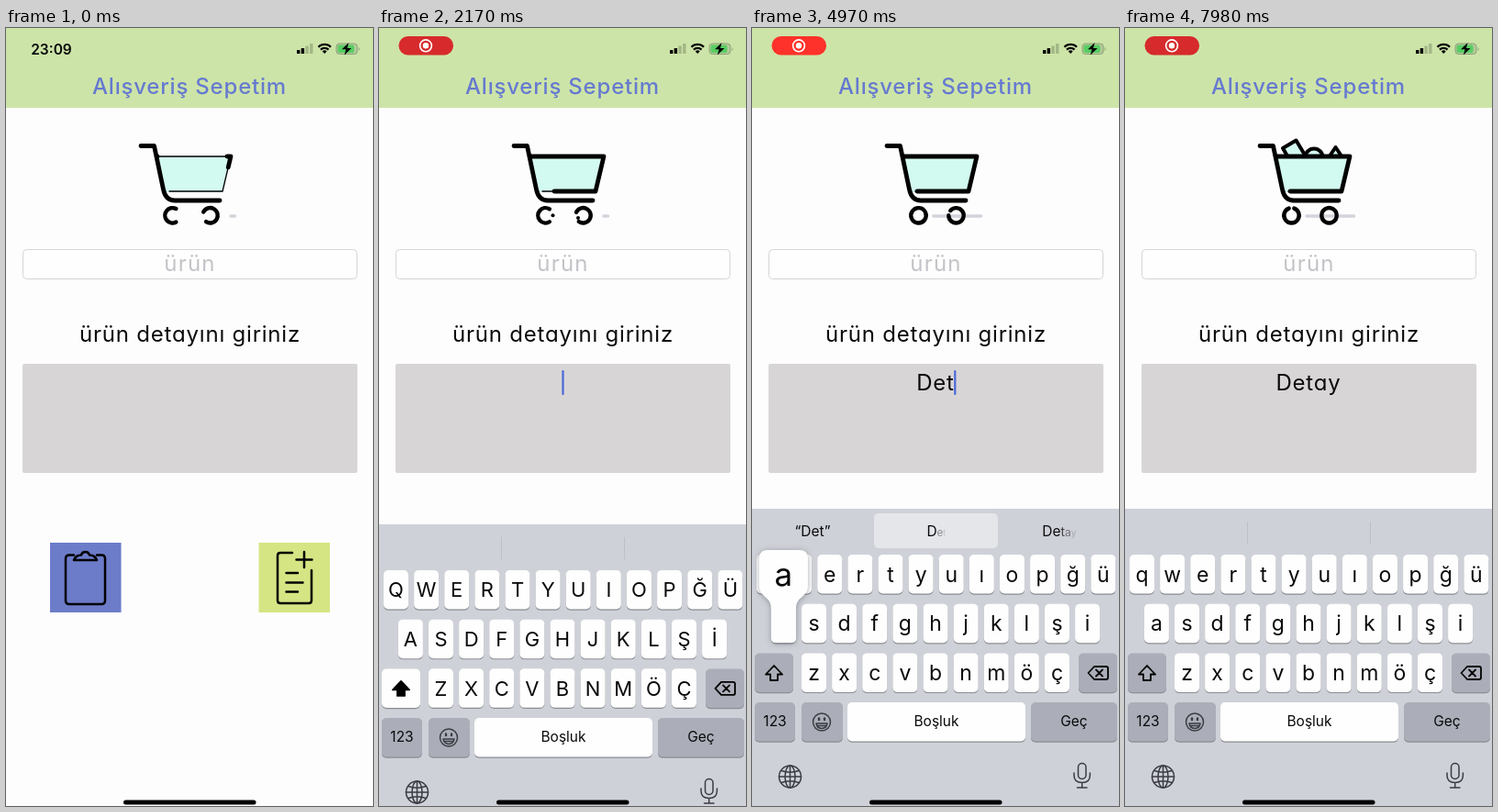
Animation, 400 px wide and 848 px high, one loop 8000 ms. Source, as an HTML page:

```html
<!DOCTYPE html>
<html lang="tr">
<head>
<meta charset="utf-8">
<title>Sepet</title>
<style>
  html, body { margin: 0; width: 100%; height: 100%; overflow: hidden; background: #fdfdfe; }
  svg { display: block; width: 400px; height: 848px; font-family: Inter, "Noto Sans", sans-serif; }
  text { text-anchor: middle; fill: #0a0a0c; white-space: pre; }
  .round { font-size: 24px; letter-spacing: .8px; font-feature-settings: "cv11"; }
  .line { fill: none; stroke: #000; stroke-linecap: round; stroke-linejoin: round; }
  .cart { stroke-width: 4.8; }
  .icon { stroke-width: 2.5; }
  .thin { stroke: #3a3c42; stroke-width: 1.5; }
  .ground { stroke: #d6d3dc; stroke-width: 3.6; }
  .item { fill: #d3faf0; stroke: #000; stroke-width: 4; stroke-linejoin: round; }
  .cap { font-size: 23px; }
  .small { font-size: 15.5px; }
</style>
</head>
<body>
<svg viewBox="0 0 400 848">
  <defs>
    <clipPath id="drop"><rect x="140" y="94" width="120" height="60"/></clipPath>
    <filter id="soft" x="-40%" y="-30%" width="180%" height="160%">
      <feDropShadow dx="0" dy="1" stdDeviation="3" flood-color="#50535c" flood-opacity=".5"/>
    </filter>
  </defs>
  <rect width="400" height="848" fill="#fdfdfe"/>
  <rect width="400" height="87" fill="#cde4a8"/>
  <text class="round" x="200" y="71.5" style="fill:#667ad0;font-weight:500">Alışveriş Sepetim</text>

  <text id="clock" x="49.5" y="28.5" font-size="15.5" font-weight="600">23:09</text>
  <g id="pill">
    <rect id="pillBody" x="21.5" y="9" width="59.5" height="20.5" rx="10"/>
    <circle cx="51" cy="19.3" r="6.4" fill="none" stroke="#fff" stroke-width="1.6"/>
    <circle cx="51" cy="19.3" r="3.2" fill="#fff"/>
  </g>
  <path d="M317 24h3.4v4H317zM321.700 22h3.400v6h-3.400z"/>
  <path d="M326.400 19.500h3.400v8.500h-3.400zM331.100 17h3.400v11h-3.400z" fill="#a3b686"/>
  <g class="line" stroke-width="2.3" style="stroke-linecap:butt">
    <path d="M340.500 20.700a9.500 9.500 0 0 1 13.500 0M343 23.600a6 6 0 0 1 8.500 0"/>
  </g>
  <path d="M344.800 25.500a3.400 3.400 0 0 1 4.900 0L347.200 28z"/>
  <rect x="360" y="17" width="23" height="11.500" rx="3.500" fill="#b4cb98" stroke="#8da078"/>
  <rect x="361.500" y="18.500" width="18" height="8.500" rx="2" fill="#58cd63"/>
  <path d="M384.700 21v4q2-2 0-4z" fill="#8da078"/>
  <path d="M373.500 16l-7.500 7.300h4.500L368.800 29.500l7.700-7.500h-4.500z"/>

  <g clip-path="url(#drop)">
    <path id="box" class="item" d="M172 131l14.500-8.500L197 140l-14 10z"/>
    <circle id="ball" class="item" cx="206" cy="141" r="9.500"/>
    <path id="cone" class="item" d="M229.500 130l9.500 14h-19z"/>
  </g>
  <path d="M166 140H245L236 179H174z" fill="#d3faf0"/>
  <path class="line" stroke-width="1.3" d="M165 140H245L236 178H178"/>
  <path id="basket" class="line cart" d="M165 140H245L236 178H180"/>
  <path class="line cart" d="M147 128.500H161.500L171.500 176Q174 188 184 188H233"/>
  <path class="line ground" d="M245 205H249.500"/>
  <path id="ground" class="line ground"/>
  <path id="wheelL" class="line" stroke-width="4.400"/>
  <path id="wheelR" class="line" stroke-width="4.400"/>
  <g id="dots"><circle cx="189.500" cy="204.300" r="2"/><circle cx="217" cy="207" r="2"/></g>

  <rect x="18.500" y="241.500" width="364" height="32" rx="4" fill="#fefefe" stroke="#d5d5d9"/>
  <text class="round" x="200.500" y="265" style="fill:#c3c3c8;letter-spacing:1.200px">ürün</text>
  <text class="round" x="200.500" y="342">ürün detayını giriniz</text>
  <rect x="18" y="366" width="365" height="119" rx="2" fill="#d8d5d6"/>
  <text id="typed" class="round" x="200" y="394.500"></text>
  <rect id="caret" y="373" width="2.200" height="27" rx="1" fill="#4868d8"/>

  <rect x="48" y="561" width="77.500" height="76" fill="#6c7cc9"/>
  <g class="line icon">
    <path d="M74 574.500H69q-4 0-4 4V624q0 4 4 4H104q4 0 4-4V578.500q0-4-4-4H99"/>
    <path d="M74 580H99Q97 574.500 91 574.500 90 571 86.500 571T82 574.500Q76 574.500 74 580z"/>
  </g>
  <rect x="275.500" y="561" width="77.500" height="76" fill="#d5e584"/>
  <path class="line icon" d="M312 572H299q-3 0-3 3V624q0 3 3 3H330q3 0 3-3V591M325 571V588M316.500 579.500H333.500M305.500 594H318M305.500 604.500H323.500M305.500 614.500H318"/>

  <g id="keyboard">
    <rect width="400" height="340" fill="#cfd1d8"/>
    <path id="dividers" d="M133.500 14V38M267.500 14V38" stroke="#bdc0c8"/>
    <rect id="choice" x="133" y="5" width="135" height="38" rx="5" fill="#e4e6e9"/>
    <g id="words" class="small">
      <text x="66" y="29.500"></text><text x="201" y="29.500"></text><text x="335" y="29.500"></text>
    </g>
    <g id="keys"></g>
    <path id="shift" class="line" stroke-width="1.800" d="M24 171l9 9.500h-5V187h-8v-6.500h-5z"/>
    <path class="line" stroke-width="1.800" d="M373 172H386q2 0 2 2V184q0 2-2 2H373L366.500 179zM375 175.500l7 7M382 175.500l-7 7"/>
    <g class="line thin">
      <circle cx="76" cy="232.500" r="9.500"/>
      <path d="M70 234H82Q81 239.500 76 239.500T70 234zM71 236.500H81"/>
      <path d="M73 228.500v1.500M79 228.500v1.500" stroke-width="2.400"/>
      <circle cx="41.500" cy="292" r="12"/>
      <ellipse cx="41.500" cy="292" rx="5.500" ry="12"/>
      <path d="M41.500 280V304M29.500 292H53.500M32 285.500Q41.500 289 51 285.500M32 298.500Q41.500 295 51 298.500"/>
      <rect x="355.500" y="277.500" width="8.500" height="17" rx="4.200"/>
      <path d="M351 288v2.500q0 8 8.700 8t8.700-8V288M359.700 298.500V304M354.500 304H365"/>
    </g>
    <g id="popup">
      <path filter="url(#soft)" fill="#fefefe" d="M-17 45H17Q26.500 45 26.500 54V84Q26.500 91 20 96T13.500 108V141Q13.500 146 8.500 146H-8.500Q-13.500 146-13.500 141V108Q-13.500 101-20 96T-26.500 84V54Q-26.500 45-17 45z"/>
      <text y="84" font-size="35"></text>
    </g>
  </g>
  <rect x="128" y="841.500" width="144.500" height="5" rx="2.500"/>
</svg>
<script>
const LOOP = 8000, KEYBOARD_START = 1533;
const $ = id => document.getElementById(id);
const clamp = v => Math.max(0, Math.min(1, v));
const show = (el, on) => el.setAttribute('opacity', +on);

// Linear interpolation through [time, value] points.
function track(t, points) {
  for (let i = 1; i < points.length; i++) {
    const [a, from] = points[i - 1], [b, to] = points[i];
    if (t < b) return from + (to - from) * clamp((t - a) / (b - a));
  }
  return points[points.length - 1][1];
}

const rows = [['QWERTYUIOPĞÜ', 5], ['ASDFGHJKLŞİ', 20.9], ['ZXCVBNMÖÇ', 54]];
const PITCH = 33.12, ROW = 53.7;
const lower = s => s.toLocaleLowerCase('tr');
const keyRect = (x, y, w, fill) =>
  `<rect x="${x}" y="${y + 1.2}" width="${w}" height="42.5" rx="5" fill="#8b8d93"/>
   <rect x="${x}" y="${y}" width="${w}" height="42.5" rx="5" fill="${fill}"/>`;
const GREY = '#abaeb8', WHITE = '#fefefe';
let markup = '';
rows.forEach(([letters, left], r) => [...letters].forEach((c, i) => {
  const x = left + i * PITCH, y = 50 + r * ROW;
  markup += keyRect(x, y, 27, WHITE) +
    `<text class="cap" data-c="${c}" x="${x + 13.5}" y="${y + 29.5}">${c}</text>`;
}));
markup += `<g id="shiftKey">${keyRect(3, 157.5, 42, GREY)}</g>` + keyRect(356, 157.5, 42, GREY);
[[3, 44, GREY, '123'], [54, 45, GREY, ''], [104, 194, WHITE, 'Boşluk'], [304, 94, GREY, 'Geç']]
  .forEach(([x, w, fill, label]) => markup += keyRect(x, 211, w, fill) +
    `<text class="small" x="${x + w / 2}" y="237">${label}</text>`);
$('keys').innerHTML = markup;
const caps = [...document.querySelectorAll('.cap')];

// Key presses: letter, start, end.
const presses = [['D', 3740, 3960], ['E', 4180, 4400], ['T', 4620, 4860], ['A', 4930, 5200], ['T', 5520, 5760]];
// Text states: start, text, two suggestions.
const states = [
  [0, '', '', ''], [3960, 'D', 'Da', 'De'], [4400, 'De', 'Da', 'Devam'],
  [4860, 'Det', 'Detay', 'Detaylar'], [5200, 'Deta', 'Detay', 'Detaylar'],
  [5760, 'Detat', 'Detay', 'Detaylar'], [6800, 'Detay', '', '']
];

function growWord(el, word, before, age) {
  let same = 0;
  while (same < word.length && word[same] === before[same]) same++;
  el.innerHTML = [...word].map((c, i) => {
    const p = i < same ? 1 : clamp((age - 40 * (i - same)) / 150);
    return p ? `<tspan font-size="${9 + 6.5 * p}" opacity="${p}">${c}</tspan>` : '';
  }).join('');
}

function arc(id, cx, centre, half) {
  const at = deg => {
    const a = deg * Math.PI / 180;
    return `${cx + 8.2 * Math.cos(a)} ${204.3 + 8.2 * Math.sin(a)}`;
  };
  const arcTo = deg => `A8.2 8.2 0 0 1 ${at(deg)}`;
  const from = centre + half, sweep = 360 - 2 * half;
  $(id).setAttribute('d', `M${at(from)}${arcTo(from + sweep / 3)}${arcTo(from + sweep * 2 / 3)}${arcTo(from + sweep)}`);
}

function drawCart(t) {
  const from = track(t, [[0, 76], [1710, 114], [2150, 0]]);
  const to = track(t, [[0, 92], [1710, 175], [2170, 164], [2500, 175]]);
  $('basket').setAttribute('stroke-dasharray', `0 ${from} ${to - from} 400`);
  arc('wheelL', 181.5, track(t, [[2500, 0], [3600, 0], [7000, -60], [7980, -90]]),
    track(t, [[0, 62], [2170, 58], [3300, 0], [7500, 0], [7980, 20]]));
  arc('wheelR', 222.5, track(t, [[0, 165], [3300, 165], [4500, 215], [4970, 200], [6240, 95], [6800, 60]]),
    track(t, [[0, 42], [2170, 40], [3300, 0], [4600, 0], [4970, 20], [6240, 26], [6900, 0]]));
  show($('dots'), t > 2050 && t < 2600);
  const left = track(t, [[2400, 245], [3700, 196], [5100, 198], [5900, 245], [6750, 245], [7600, 198]]);
  const right = track(t, [[2400, 245], [2700, 237], [3810, 237], [4400, 245]]);
  $('ground').setAttribute('d', left < right ? `M${left} 205H${right}` : '');
  [['box', 5200, 62], ['ball', 6230, 57.5], ['cone', 6950, 56]].forEach(([id, start, height]) => {
    const p = clamp((t - start) / 560);
    show($(id), t >= start);
    $(id).setAttribute('transform', `translate(0 ${-height * (1 - p * p)})`);
  });
}

function drawKeyboard(t) {
  const w = Math.max(0, t - KEYBOARD_START) * .00735;
  const hidden = (1 + w) * Math.exp(-w);
  $('keyboard').setAttribute('transform', `translate(0 ${524 + 324 * hidden})`);

  const isUpper = t < 3960;
  caps.forEach(el => {
    el.textContent = isUpper ? el.dataset.c : lower(el.dataset.c);
    el.style.fontSize = isUpper ? '22px' : '23px';
  });
  $('shift').style.fill = isUpper ? '#000' : 'none';
  $('shiftKey').lastElementChild.setAttribute('fill', isUpper ? WHITE : GREY);

  const press = presses.find(([, a, b]) => t >= a && t < b);
  show($('popup'), !!press);
  if (press) {
    const r = rows.findIndex(([letters]) => letters.includes(press[0]));
    const x = rows[r][1] + rows[r][0].indexOf(press[0]) * PITCH + 13.5;
    $('popup').setAttribute('transform', `translate(${x} ${(r - 1) * ROW})`);
    $('popup').lastElementChild.textContent = isUpper ? press[0] : lower(press[0]);
  }
}

function drawText(t) {
  const n = states.filter(s => t >= s[0]).length - 1;
  const [start, text, mid, side] = states[n], before = states[Math.max(0, n - 1)];
  const typed = $('typed'), words = $('words').children;
  typed.textContent = text;
  const width = text ? typed.getComputedTextLength() : 0;
  $('caret').setAttribute('x', 199.4 + width / 2);
  show($('caret'), t < KEYBOARD_START ? 0 : track(t,
    [[2550, 1], [2750, 0], [3400, 0], [3600, 1], [7600, 1], [7850, 0]]));
  words[0].textContent = mid ? `“${text}”` : '';
  growWord(words[1], mid, before[2], t - start - 50);
  growWord(words[2], side, before[3], t - start);
  const chosen = t >= 4860 && t < 6800;
  show($('choice'), chosen);
  show($('dividers'), !chosen);
}

function drawStatus(t) {
  const recording = t >= 700;
  show($('clock'), !recording);
  show($('pill'), recording);
  const glow = .5 + .5 * Math.cos((t - 5000) / 6300 * 2 * Math.PI);
  $('pillBody').setAttribute('fill', `rgb(${214 + 40 * glow} ${42 + 8 * glow} ${44 - 2 * glow})`);
}

function frame() {
  const t = performance.now() % LOOP;
  drawStatus(t);
  drawCart(t);
  drawKeyboard(t);
  drawText(t);
  requestAnimationFrame(frame);
}
frame();
</script>
</body>
</html>
```
